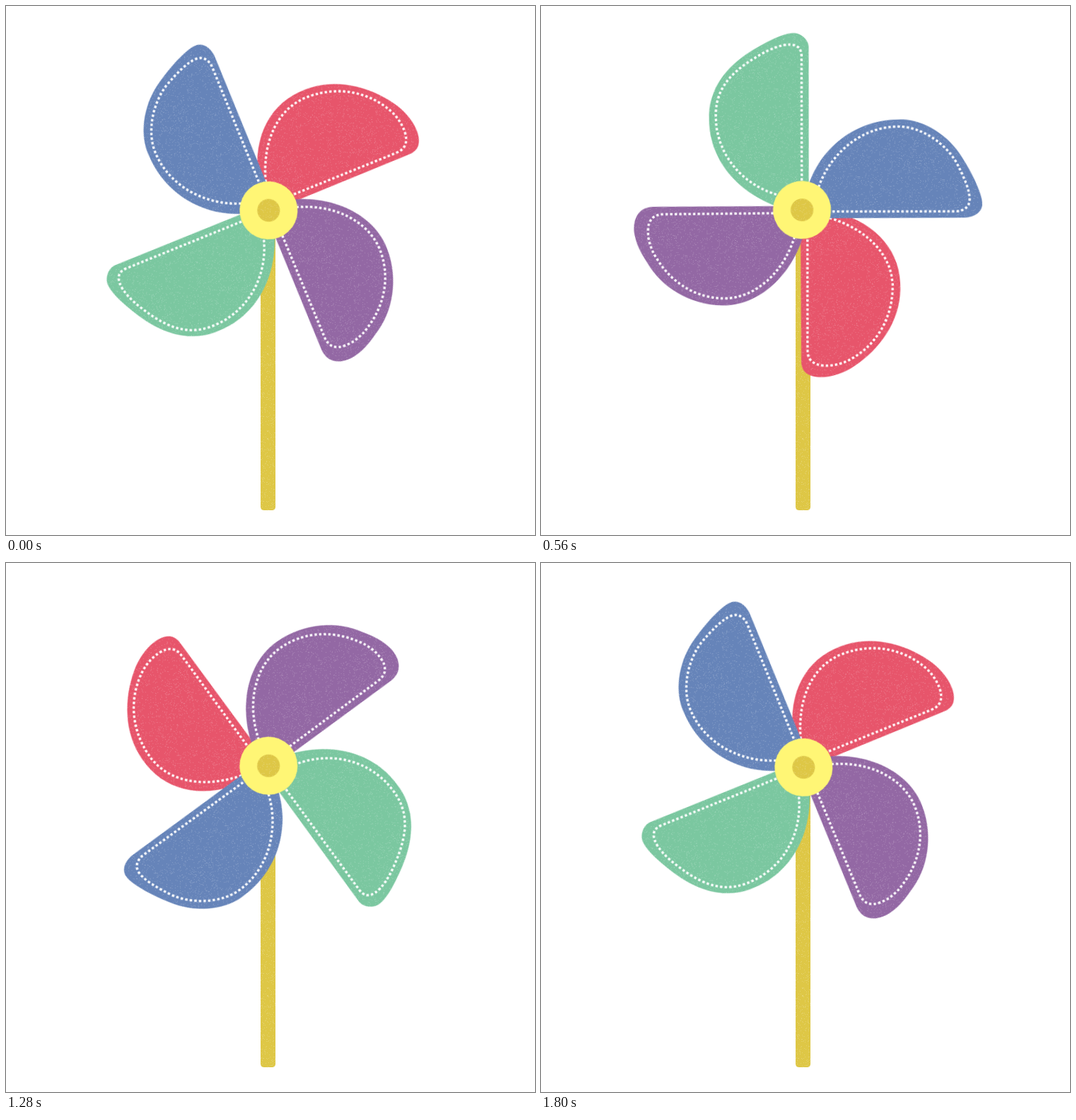
Write an HTML page that moves like this. It is 748x748 px and loops after 2000 ms.

```html
<!DOCTYPE html>
<html lang="en">
<head>
<meta charset="utf-8">
<title>Pinwheel</title>
<style>
  html, body { margin: 0; width: 100%; height: 100%; overflow: hidden; background: #fff; }
  svg { display: block; width: 100vw; height: 100vh; }
  #wheel {
    transform-origin: 370.4px 287.9px;
    animation: spin 2000ms linear infinite;
  }
  /* 45 steps of 8 degrees, then a short rest */
  @keyframes spin {
    0% { transform: rotate(0deg); animation-timing-function: steps(45, end); }
    90%, 100% { transform: rotate(360deg); }
  }
  .stitch {
    fill: none;
    stroke: #fff;
    stroke-width: 3.3;
    stroke-dasharray: 3.4 3.1;
  }
</style>
</head>
<body>
<svg viewBox="0 0 748 748">
  <defs>
    <pattern id="grain" width="120" height="120" patternUnits="userSpaceOnUse">
      <path id="specks" fill="#fff" fill-opacity=".2"/>
    </pattern>
  </defs>
  <g id="stick">
    <rect x="360" y="289" width="21" height="424" rx="4.5" fill="#dec746"/>
    <rect x="360" y="289" width="21" height="424" rx="4.5" fill="url(#grain)"/>
  </g>
  <g id="wheel">
    <g id="parts" transform="rotate(-200 370.4 287.9)"></g>
  </g>
</svg>
<script>
const blades = [
  {
    color: '#7bc7a0',
    shape: 'M370 262C389 194 437 150.5 500 150.5C544 150.5 575 180.5 593.5 209.3C606 229 619.5 252 619.5 267C619.5 276 611 287.5 600 288L410 294.8L370 296Z',
    seam: 'M389 256C400 203 444 160 503 160C543 160 566 187 584.4 215.5C596 233 603 250 603 262C603 272 598 278 587 278.3L405 285'
  },
  {
    color: '#e7556b',
    shape: 'M368 335C355 393 315 429.5 262 429.5C216 429.5 177 403 152 368.4C142 355 134.5 336 134.5 321C134.5 302 142 293.5 156 293L330 286L368 284Z',
    seam: 'M335 295.5L172 301.3C158 301.8 151 311 151 326C151 337 154 351 161 362C179 393.5 215 418.5 262 418.5C307 418.5 344 384 360 326'
  },
  {
    color: '#9368a4',
    shape: 'M335 290C279 276 231 231 231 177C231 133 253 92 287.7 70.6C305 58 322 50 337 50C353 50 366 58 367 76L374 250L372 290Z',
    seam: 'M338 279C284 267 241 226 241 178C241 140 260 106 295 83C308 74 322 70 333 70C348 70 356.5 76 357 92L364 250'
  },
  {
    color: '#6684b9',
    shape: 'M400 293C457 307 502.8 358 502.8 424C502.8 455 483 490 451.7 510.6C432 524 402 541 387 541C376 541 368 531 367 516L359.7 330L360 290Z',
    seam: 'M403 309C450 323 492.5 367 492.5 422C492.5 450 473 484 446 501.5C425 514 405 523 393 523C382 523 376 515 375.5 503L369 325'
  }
];

const parts = document.getElementById('parts');

function add(tag, attrs) {
  const el = document.createElementNS('http://www.w3.org/2000/svg', tag);
  for (const key in attrs) el.setAttribute(key, attrs[key]);
  parts.append(el);
}

function disc(r, fill) {
  add('circle', { cx: 369.9, cy: 286.6, r, fill });
}

// Paper grain: one tile of seeded specks
let seed = 7;
function random() {
  seed = (seed * 16807) % 2147483647;
  return seed / 2147483647;
}
let specks = '';
for (let i = 0; i < 1100; i++) {
  specks += `M${Math.floor(random() * 120)} ${Math.floor(random() * 120)}h1v1h-1z`;
}
document.getElementById('specks').setAttribute('d', specks);

for (const { color, shape, seam } of blades) {
  add('path', { d: shape, fill: color });
  add('path', { d: shape, fill: 'url(#grain)' });
  add('path', { d: seam, class: 'stitch' });
}
disc(41, '#fff675');
disc(16, '#dec746');
disc(16, 'url(#grain)');
</script>
</body>
</html>
```
